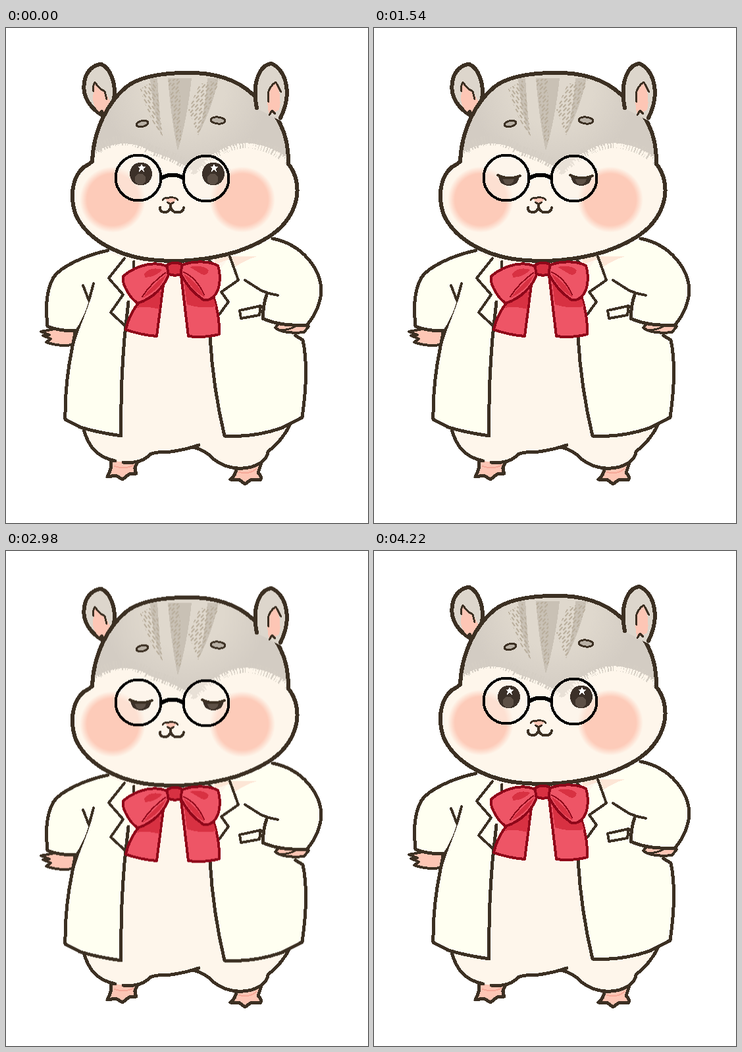
These frames come from a looping animation (550x750 px, 4290 ms). An HTML page without scripts:

```html
<!DOCTYPE html>
<html lang="en">
<head>
<meta charset="utf-8">
<title>Hamster in a white coat</title>
<style>
  html, body { margin: 0; width: 100%; height: 100%; overflow: hidden; background: #fff; }
  svg { display: block; width: 550px; height: 750px; }
  path, ellipse, circle { stroke-linecap: round; stroke-linejoin: round; }

  .ink { stroke: #3c3023; stroke-width: 5; }
  .bold { stroke-width: 6; }
  .thin { stroke-width: 4; }
  .fine { stroke-width: 3; }
  .line { fill: none; }
  .cream { fill: #fef6eb; }
  .coat { fill: #fffff1; }
  .pink { fill: #fdc6b5; }
  .grey { fill: #ddd6cc; }
  .fur { fill: none; stroke-width: 15; stroke-dasharray: 2 2.4 1 3.1 3 1.7; stroke-linecap: butt; }
  .bow path { stroke: #8f0719; stroke-width: 4; fill: #ee5566; }
  .bow .shade { stroke: none; fill: #d83142; }

  .upper, .arms, .open, .half, .shut { animation: 4290ms step-end infinite; }
  .upper { animation-name: breathe; }
  .arms { animation-name: squash; transform-origin: 0 320px; }
  .open { animation-name: open; }
  .half { animation-name: half; }
  .shut { animation-name: shut; }

  @keyframes breathe {
    0%, 28.2%, 59.44%, 90.67%, 100% { transform: none; }
    5.36%, 24.24%, 37.52%, 55.47%, 68.76%, 86.71% { transform: translateY(2.5px); }
    9.32%, 20.27%, 44.52%, 51.51%, 75.75%, 82.75% { transform: translateY(5px); }
    13.28%, 49.88%, 81.11% { transform: translateY(7px); }
  }
  @keyframes squash {
    0%, 28.2%, 59.44%, 90.67%, 100% { transform: none; }
    5.36%, 24.24%, 37.52%, 55.47%, 68.76%, 86.71% { transform: scaleY(.994); }
    9.32%, 20.27%, 44.52%, 51.51%, 75.75%, 82.75% { transform: scaleY(.987); }
    13.28%, 49.88%, 81.11% { transform: scaleY(.979); }
  }
  @keyframes open {
    0%, 67.13%, 98.36%, 100% { opacity: 1; }
    35.89%, 68.76% { opacity: 0; }
  }
  @keyframes half {
    0%, 40.55%, 51.51%, 71.79%, 82.75%, 100% { opacity: 0; }
    35.89%, 49.88%, 68.76%, 81.11% { opacity: 1; }
  }
  @keyframes shut {
    0%, 49.88%, 67.13%, 81.11%, 98.36%, 100% { opacity: 0; }
    40.55%, 51.51%, 71.79%, 82.75% { opacity: 1; }
  }
</style>
</head>
<body>
<svg viewBox="0 0 550 750" shape-rendering="crispEdges">
  <defs>
    <path id="head" d="M131 202C133 152 156 112 182 90C205 71 245 67 288 68C330 70 362 84 384 110C412 126 430 160 429 206C441 220 446 244 440 264C430 300 400 322 350 339C310 351 260 357 211 350C163 342 122 318 106 283C96 255 101 225 118 211C125 207 130 204 131 202Z"/>
    <clipPath id="inHead"><use href="#head"/></clipPath>
    <radialGradient id="cap" gradientUnits="userSpaceOnUse" cx="272" cy="88" r="150">
      <stop offset=".4" stop-color="#dfd8cd"/>
      <stop offset=".85" stop-color="#d3ccc3"/>
    </radialGradient>
    <radialGradient id="blush">
      <stop offset=".78" stop-color="#fdcbb9"/>
      <stop offset="1" stop-color="#fdcbb9" stop-opacity="0"/>
    </radialGradient>
    <pattern id="hair" width="11" height="8" patternUnits="userSpaceOnUse" patternTransform="rotate(-48)">
      <path d="M0 2H7M4 6H10" stroke="#b8ad9b" stroke-width="1.2"/>
    </pattern>
    <pattern id="hairLeft" href="#hair" patternTransform="rotate(55)"/>
    <g id="openEye">
      <ellipse rx="17" ry="17.5" fill="#3b3028"/>
      <circle cx="-1" cy="8" r="8.5" fill="#5d5046"/>
      <path d="M1-15l2 4 4 0-3 3 1 5-4-3-4 3 1-5-3-3 4 0z" fill="#fff"/>
    </g>
    <g id="halfEye">
      <path d="M-16 3Q0 9 16 3Q14 18 0 18T-16 3Z" fill="#3b3028"/>
      <path d="M-9 8H8Q6 16-1 16T-9 8Z" fill="#5d5046"/>
      <path class="ink line thin" d="M-17 2Q0 10 17 3"/>
    </g>
    <path id="shutEye" class="ink line fine" d="M-17 4Q-11 12 1 12T17 7"/>
  </defs>

  <!-- feet, legs and belly stay planted -->
  <g class="ink">
    <path class="pink" d="M160 655Q161 668 154 680L167 678L177 684L187 676L198 675Q193 667 200 658"/>
    <path class="pink" d="M350 667Q349 678 341 684L354 684L363 691L373 684L386 685Q390 681 383 674L388 659"/>
    <path class="cream" stroke="none" d="M155 340H385L432 600C425 616 415 627 404 635C396 640 398 648 388 658C368 670 338 671 318 655Q304 640 288 635Q258 642 222 644Q205 660 180 658C148 655 127 638 118 608Z"/>
    <path class="line" d="M118 608C126 638 142 651 166 656M178 658Q205 661 219 646Q227 642 242 643Q270 640 293 632"/>
    <path class="line" d="M284 635Q302 639 315 653C338 671 369 671 388 658Q397 651 398 642C412 631 424 617 432 600"/>
    <path d="M165 664Q180 669 193 663M354 673Q370 677 380 668" fill="none" stroke="#f6a898" stroke-width="2"/>
  </g>

  <g class="upper">
    <!-- coat -->
    <g class="ink">
      <path class="coat" stroke="none" d="M180 349L150 338L110 360L105 460C95 500 88 550 90 593Q128 612 175 618Q175 530 184 440L194 355Z"/>
      <path class="coat" stroke="none" d="M340 346L405 319L452 470C458 510 455 560 450 590Q400 619 332 618Q316 550 310 466L315 380Z"/>
      <path class="line" d="M131 392C124 424 107 454 101 482Q89 540 90 593L113 605Q140 613 175 618C174 560 177 505 180 470L186 415"/>
      <path class="line" d="M310 468C313 520 321 572 332 618Q375 621 419 606L450 590C456 548 458 505 451 473L440 466"/>
      <path class="line thin" d="M180 349L156 379L178 404L159 431L183 453M194 354V362"/>
      <path fill="#fde6d6" stroke="none" d="M316 346H382Q366 350 348 362L340 350L318 358Z"/>
      <path class="line thin" d="M340 346L353 382L327 400L338 415L324 434M309 352L315 358"/>
    </g>

    <g class="arms ink">
      <path class="coat thin" d="M355 428L387 421L385 435L357 440Z"/>
      <path class="pink thin" d="M74 456L53 460L66 465L56 466L68 471L61 476Q80 483 101 480L105 459"/>
      <path class="pink thin" d="M409 454Q421 464 453 461L460 452L450 446H416Z"/>
      <path class="line fine" d="M412 457Q428 459 440 452"/>
      <path class="coat" stroke="none" d="M155 337C122 344 85 360 72 378C59 402 61 430 63 452Q83 460 105 458Q125 430 131 390L150 360Z"/>
      <path class="line" d="M155 337C122 344 85 360 72 378C59 402 61 430 63 452Q83 460 105 458"/>
      <path class="line thin" d="M133 387L126 413L117 390"/>
      <path class="coat" stroke="none" d="M405 319C450 328 480 365 479 402Q474 432 457 450Q415 452 390 440Q391 418 398 402L380 350Z"/>
      <path class="line" d="M405 319C450 328 480 365 479 402Q474 432 457 450Q415 452 390 440Q391 418 396 404"/>
      <path class="line thin" d="M363 382L388 398Q400 403 413 405"/>
    </g>

    <!-- head and ears -->
    <path class="ink bold grey" d="M149 134C128 122 115 104 119 82C121 66 133 55 145 55C158 60 168 84 164 108"/>
    <path class="pink" d="M135 83L150 96L159 112L149 131Q132 124 132 105Z"/>
    <path class="ink line fine" d="M135 82Q131 89 133 96M135 82Q141 92 150 96L153 108M141 130L146 125L148 132"/>

    <use href="#head" class="cream"/>
    <g clip-path="url(#inHead)">
      <path fill="url(#cap)" d="M100 40H440V206Q405 176 365 174Q326 181 287 218Q258 198 222 188Q180 160 132 194Z"/>
      <path class="fur" stroke="#d5cec4" d="M132 188Q178 154 220 185Q256 194 285 214Q326 178 365 174Q405 178 432 203"/>
      <path class="fur" stroke="#fef6eb" stroke-dashoffset="3" d="M132 199Q178 168 218 196M302 211Q336 180 368 182Q405 186 427 212"/>
      <g fill="#c9c1b5">
        <path d="M246 76H282Q275 140 261 186Q251 140 246 76ZM219 76H230L236 163Q223 128 219 76ZM306 76H323Q312 126 291 163Q304 120 306 76Z"/>
        <path fill="url(#hairLeft)" d="M204 92L228 78L238 165Q218 142 204 92Z"/>
        <path fill="url(#hair)" d="M246 77H264L266 168L260 180ZM277 124L294 85L325 78L292 163Z"/>
      </g>
      <g fill="url(#blush)">
        <ellipse cx="162" cy="260" rx="50" ry="50"/>
        <ellipse cx="359" cy="260" rx="50" ry="50"/>
      </g>
    </g>
    <use href="#head" class="ink bold line"/>

    <path class="grey" d="M381 122C373 82 386 56 403 54C425 62 439 98 416 140Z"/>
    <path class="pink" d="M410 82L399 96Q395 115 400 131L415 124Q420 103 410 82Z"/>
    <path class="ink line fine" d="M410 82Q400 88 398 100L399 112M410 82L418 97M400 132L404 125L409 130"/>
    <path class="ink line bold" d="M381 121C373 82 386 56 403 54C423 61 437 96 417 136"/>

    <!-- face -->
    <g class="ink fine" fill="#b8b0a5">
      <ellipse cx="207" cy="145" rx="9" ry="4.5" transform="rotate(-12 207 145)"/>
      <ellipse cx="322" cy="140" rx="11" ry="5" transform="rotate(6 322 140)"/>
    </g>
    <g fill="#fef6eb" fill-opacity=".5">
      <circle cx="201" cy="227" r="34"/>
      <circle cx="304" cy="228" r="34"/>
    </g>
    <g class="open">
      <use href="#openEye" x="205" y="221"/>
      <use href="#openEye" x="315" y="221"/>
    </g>
    <g class="half">
      <use href="#halfEye" x="205" y="221"/>
      <use href="#halfEye" x="315" y="221"/>
    </g>
    <g class="shut">
      <use href="#shutEye" x="205" y="221"/>
      <use href="#shutEye" x="316" y="221"/>
    </g>
    <g fill="none" stroke="#000" stroke-width="4">
      <circle cx="201" cy="227" r="34.5"/>
      <circle cx="304" cy="228" r="34.5"/>
      <path stroke-width="6" d="M237 227Q253 218 269 227"/>
    </g>
    <path class="pink" d="M240 258Q250 254 260 259L250 268Z"/>
    <path class="ink line fine" d="M238 261Q239 257 248 257Q259 256 261 261M245 264L250 267L255 264"/>
    <path class="ink line thin" d="M250 267V272Q247 280 241 279Q234 279 234 272M250 272Q254 280 260 279Q269 280 270 272"/>

    <!-- bow -->
    <g class="bow" transform="translate(-1 1)">
      <path d="M240 388L230 466Q205 464 183 456Q188 432 205 412Z"/>
      <path d="M267 374L278 466Q302 469 325 463Q326 435 316 405Z"/>
      <path class="shade" d="M205 415L236 397L234 425Q215 420 200 423ZM272 386L302 412L317 410L320 421Q299 425 276 418Z"/>
      <path d="M247 361C230 352 202 356 179 375C176 386 189 408 201 416C224 409 243 390 249 370Z"/>
      <path d="M266 359C286 351 310 352 323 359C328 375 326 394 319 403Q311 413 301 411Q279 396 266 371Z"/>
      <path class="shade" d="M211 371Q221 360 238 365Q230 376 212 377ZM209 408Q222 389 244 373Q236 394 209 408ZM271 372Q290 382 303 407Q283 397 271 372ZM280 361Q300 357 309 366Q307 375 298 372Z"/>
      <path style="stroke-width:2;fill:none" d="M243 370Q222 385 208 406M271 369Q290 377 302 403"/>
      <path style="fill:#d83142" d="M246 358Q256 352 268 357L267 372Q256 376 247 371Z"/>
    </g>
  </g>
</svg>
</body>
</html>
```
